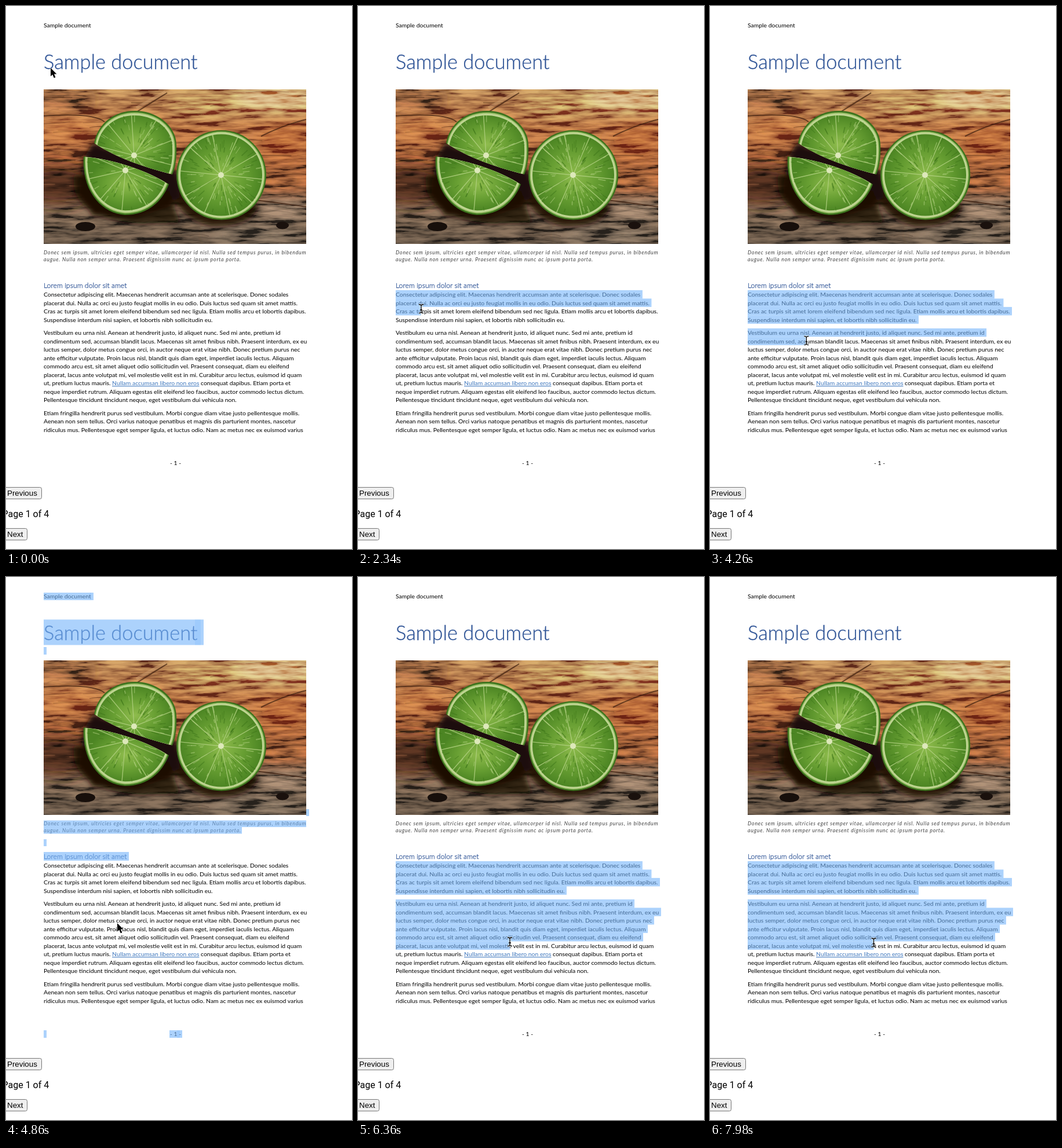
Animation of 597x938 px, one loop 8 s. Source, as an HTML page:

```html
<!DOCTYPE html>
<html lang="en">
<head>
<meta charset="utf-8">
<title>Sample document</title>
<style>
  html, body { margin: 0; width: 100%; height: 100%; overflow: hidden; background: #fff; }
  svg { display: block; width: 100vw; height: 100vh; }
  text { white-space: pre; }
  .doc { font: 10.4px Lato, sans-serif; }
  .title { font-size: 34.4px; font-weight: 300; fill: #2f5496; stroke: #2f5496; stroke-width: .35px; }
  .heading { font-size: 12.3px; font-weight: 300; fill: #2f5496; stroke: #2f5496; stroke-width: .3px; }
  .caption { font-size: 8.9px; font-style: italic; letter-spacing: .77px; fill: #404040; }
  .link { fill: #3d76bd; text-decoration: underline; }
  .button rect { fill: #efefef; stroke: #767676; }
  .button text { font: 13.33px "Liberation Sans", Arial, sans-serif; }
  .status { font: 16px Roboto, sans-serif; }
  .mark { fill: rgb(118 180 250 / .6); }
  .texture { mix-blend-mode: overlay; }
</style>
</head>
<body>
<svg viewBox="0 0 597 938" preserveAspectRatio="none">
  <defs>
    <linearGradient id="wood" x1="0" y1="0" x2="0" y2="1">
      <stop offset="0" stop-color="#9a6842"/>
      <stop offset=".25" stop-color="#9c5a35"/>
      <stop offset=".6" stop-color="#784629"/>
      <stop offset=".76" stop-color="#63503f"/>
      <stop offset="1" stop-color="#524539"/>
    </linearGradient>
    <radialGradient id="flesh">
      <stop offset="0" stop-color="#8fbc4d"/>
      <stop offset=".55" stop-color="#689f33"/>
      <stop offset="1" stop-color="#4c8523"/>
    </radialGradient>
    <filter id="soft" x="-50%" y="-50%" width="200%" height="200%"><feGaussianBlur stdDeviation="12"/></filter>
    <filter id="edge" x="-20%" y="-20%" width="140%" height="140%"><feGaussianBlur stdDeviation="5"/></filter>
    <filter id="fibres" x="0" y="0" width="100%" height="100%">
      <feTurbulence type="fractalNoise" baseFrequency=".018 .13" numOctaves="4" seed="4"/>
      <feColorMatrix values="2.6 0 0 0 -.85  2.6 0 0 0 -.85  2.6 0 0 0 -.85  0 0 0 0 1"/>
    </filter>
    <clipPath id="frame"><rect x="65" y="144" width="453" height="267"/></clipPath>
  </defs>

  <g id="photo" clip-path="url(#frame)">
    <rect x="65" y="144" width="453" height="267" fill="url(#wood)"/>
    <g filter="url(#soft)">
      <ellipse cx="465" cy="160" rx="80" ry="20" fill="#d0a06c"/>
      <ellipse cx="345" cy="172" rx="65" ry="18" fill="#b5814f"/>
      <ellipse cx="95" cy="162" rx="50" ry="14" fill="#70482d"/>
      <ellipse cx="110" cy="216" rx="45" ry="18" fill="#a75a32"/>
      <ellipse cx="480" cy="235" rx="45" ry="32" fill="#a6562f"/>
      <ellipse cx="480" cy="300" rx="40" ry="18" fill="#8f5433"/>
      <ellipse cx="90" cy="310" rx="60" ry="34" fill="#3a2315"/>
      <ellipse cx="480" cy="350" rx="50" ry="14" fill="#776352"/>
      <ellipse cx="430" cy="395" rx="80" ry="14" fill="#64564a"/>
    </g>
    <rect class="texture" x="65" y="144" width="453" height="267" filter="url(#fibres)" opacity=".6"/>
    <g id="grain" fill="none"/>
    <path d="M65 190Q150 184 170 200M190 205L278 150M440 225Q480 205 518 196M430 335Q470 340 518 347" fill="none" stroke="#3d1e0f" stroke-width="2" opacity=".7"/>
    <path d="M225 176L275 148" stroke="#d0a070" stroke-width="5" opacity=".5"/>
    <g fill="#1d0e07" filter="url(#edge)">
      <path d="M150 236L296 285 300 330 285 345 225 366 150 362 125 325 134 262Z"/>
      <path d="M278 300Q290 365 355 380Q420 382 435 346L380 280Z" opacity=".9"/>
      <path d="M118 290Q105 365 230 376L300 374 280 320Z" opacity=".8"/>
    </g>
    <ellipse cx="137" cy="381" rx="17" ry="8" fill="#170f0b"/>
    <ellipse cx="477" cy="379" rx="11" ry="6.5" fill="#1a110d"/>
    <g id="limes"/>
  </g>

  <g id="page" class="doc"></g>

  <g class="button"><rect x="-5.5" y="831.5" width="67" height="20" rx="3"/><text x="2" y="846">Previous</text></g>
  <text class="status" x="-6.5" y="883">Page 1 of 4</text>
  <g class="button"><rect x="-5.5" y="902.5" width="42" height="20" rx="3"/><text x="2" y="917">Next</text></g>

  <g id="selection" class="mark"></g>
  <g id="outside" class="mark"></g>
  <path id="arrow" d="M0 0V14.5L3.3 11.5 5.8 17.3 8.4 16.2 6 10.5H10.4Z" stroke="#fff" stroke-width="1" paint-order="stroke"/>
  <g id="beam" fill="none">
    <path d="M-4-7.5Q0-7.5 0-5V5Q0 7.5-4 7.5M4-7.5Q0-7.5 0-5V5Q0 7.5 4 7.5M-2 2H2" stroke="#fff" stroke-width="3" opacity=".7"/>
    <path d="M-4-7.5Q0-7.5 0-5V5Q0 7.5-4 7.5M4-7.5Q0-7.5 0-5V5Q0 7.5 4 7.5M-2 2H2" stroke="#000" stroke-width="1.3"/>
  </g>
</svg>
<script>
const LEFT = 65, LEADING = 14.5, LOOP = 8000, STEP = 60;
const $ = id => document.getElementById(id);

function add(parent, tag, attrs, text) {
  const node = document.createElementNS('http://www.w3.org/2000/svg', tag);
  for (const name in attrs) node.setAttribute(name, attrs[name]);
  if (text) node.textContent = text;
  return parent.appendChild(node);
}

let seed = 7;
const random = () => (seed = seed * 16807 % 2147483647) / 2147483647;

// Photograph
function drawGrain() {
  for (let i = 0; i < 130; i++) {
    const x = 55 + random() * 450, y = 146 + random() * 264, length = 15 + random() * 60;
    const tones = y < 330 ? ['#40200f', '#d3935f'] : ['#241b16', '#9a8672'];
    add($('grain'), 'path', {
      d: `M${x} ${y}q${length / 2} ${random() * 6 - 5} ${length} ${random() * 6 - 4}`,
      stroke: tones[i % 2], 'stroke-width': .5 + random() * 1.3, opacity: .2 + random() * .25
    });
  }
}

// The rind is thick away from `cut`, the middle of the cut edge; the rays meet at `hub`
function drawLime(id, outline, hub, cut, radius, turn) {
  const scaled = s => `translate(${cut}) scale(${s}) translate(${cut.map(v => -v)})`;
  const layer = (s, fill) => add($('limes'), 'path', { d: outline, fill, transform: scaled(s) });
  const point = (angle, r) => [hub[0] + Math.cos(angle) * r, hub[1] + Math.sin(angle) * r];
  const ray = (group, angle, from, to, attrs) => add(group, 'path', {
    d: `M${point(angle, from)}L${point(angle, to)}`, 'stroke-linecap': 'round', ...attrs
  });
  layer(1, '#3b731d');
  layer(.97, '#8fb75d');
  layer(.95, '#bfd592');
  layer(.91, 'url(#flesh)');
  const clip = add($('limes'), 'clipPath', { id });
  add(clip, 'path', { d: outline, transform: scaled(.92) });
  const pulp = add($('limes'), 'g', { 'clip-path': `url(#${id})` });
  for (let i = 0; i < 130; i++) {
    const from = radius * (.2 + random() * .65);
    ray(pulp, random() * Math.PI * 2, from, from + 4 + random() * 9, {
      stroke: i % 2 ? '#b6d485' : '#3d7519', 'stroke-width': 1 + random(), opacity: .5
    });
  }
  for (let i = 0; i < 10; i++) {
    ray(pulp, turn + i * Math.PI / 5, 0, radius, { stroke: '#b3d183', 'stroke-width': 1.4, opacity: .8 });
  }
  add(pulp, 'circle', { cx: hub[0], cy: hub[1], r: 5, fill: '#dde8ba' });
}

drawGrain();
drawLime('limeTop', 'M152 237C158 203 187 181 222 181C262 181 294 208 294 240C295 262 292 280 287 291C240 279 190 262 152 237Z', [221, 258], [216, 269], 90, .25);
drawLime('limeBottom', 'M134 260C180 264 240 282 281 308C268 342 240 361 205 361C165 358 130 320 134 260Z', [206, 284], [209, 276], 90, .4);
drawLime('limeRight', 'M294 292a77.5 77.5 0 1 0 155 0a77.5 77.5 0 1 0-155 0Z', [371, 292], [371.5, 292], 78, .1);

// Document text
const write = (y, text, style = '', x = LEFT) => add($('page'), 'text', { x, y, class: style }, text);

write(37, 'Sample document');
write(109, 'Sample document', 'title');
write(429, 'Donec sem ipsum, ultricies eget semper vitae, ullamcorper id nisl. Nulla sed tempus purus, in bibendum', 'caption');
write(441, 'augue. Nulla non semper urna. Praesent dignissim nunc ac ipsum porta porta.', 'caption');
write(487, 'Lorem ipsum dolor sit amet', 'heading');
write(793.3, '- 1 -', '', 283);

const paragraphs = [
  [502.2, `Consectetur adipiscing elit. Maecenas hendrerit accumsan ante at scelerisque. Donec sodales
placerat dui. Nulla ac orci eu justo feugiat mollis in eu odio. Duis luctus sed quam sit amet mattis.
Cras ac turpis sit amet lorem eleifend bibendum sed nec ligula. Etiam mollis arcu et lobortis dapibus.
Suspendisse interdum nisi sapien, et lobortis nibh sollicitudin eu.`],
  [568.2, `Vestibulum eu urna nisl. Aenean at hendrerit justo, id aliquet nunc. Sed mi ante, pretium id
condimentum sed, accumsan blandit lacus. Maecenas sit amet finibus nibh. Praesent interdum, ex eu
luctus semper, dolor metus congue orci, in auctor neque erat vitae nibh. Donec pretium purus nec
ante efficitur vulputate. Proin lacus nisl, blandit quis diam eget, imperdiet iaculis lectus. Aliquam
commodo arcu est, sit amet aliquet odio sollicitudin vel. Praesent consequat, diam eu eleifend
placerat, lacus ante volutpat mi, vel molestie velit est in mi. Curabitur arcu lectus, euismod id quam
ut, pretium luctus mauris. [Nullam accumsan libero non eros] consequat dapibus. Etiam porta et
neque imperdiet rutrum. Aliquam egestas elit eleifend leo faucibus, auctor commodo lectus dictum.
Pellentesque tincidunt tincidunt neque, eget vestibulum dui vehicula non.`],
  [706.8, `Etiam fringilla hendrerit purus sed vestibulum. Morbi congue diam vitae justo pellentesque mollis.
Aenean non sem tellus. Orci varius natoque penatibus et magnis dis parturient montes, nascetur
ridiculus mus. Pellentesque eget semper ligula, et luctus odio. Nam ac metus nec ex euismod varius`]
];

const lines = paragraphs.flatMap(([baseline, copy]) => copy.split('\n').map((line, i) => {
  const y = baseline + i * LEADING;
  const node = write(y, '');
  line.split(/[[\]]/).forEach((part, k) => add(node, 'tspan', { class: k === 1 ? 'link' : '' }, part));
  const right = LEFT + node.getComputedTextLength() + 3.5;
  const mark = add($('selection'), 'rect', { x: LEFT, y: y - 11.3, height: LEADING, width: 0 });
  return { top: y - 11.3, right, mark };
}));

// Everything before the paragraphs, marked while the pointer is between lines
[
  [65, 27, 86, 13], [145, 27, 2, 13],
  [65, 73.5, 276, 44], [326, 73.5, 10, 44],
  [65, 121, 5, 13], [518, 401, 5, 12],
  [65, 420.5, 453, 11.5], [65, 432, 342, 11.5],
  [65, 453, 5, 12], [65, 475, 147, 15],
  [65, 783, 5, 13], [282, 783, 22, 13], [295, 783, 5, 13]
].forEach(([x, y, width, height], i) =>
  add($('outside'), 'rect', { x, y, width, height, opacity: [1, 3, 12].includes(i) ? .4 : 1 }));

// Pointer: time, x, y
const path = [
  [0, 77, 107], [300, 77, 109], [1200, 67, 496], [1560, 67, 498], [2340, 109, 523],
  [3060, 125, 540], [3420, 131, 547], [3600, 132, 548], [3840, 140, 558], [4620, 189, 595],
  [4860, 192, 598], [5100, 196, 601], [5940, 243.5, 622], [6360, 262, 630],
  [7200, 280, 631], [7500, 282.5, 631.5], [8000, 282.5, 631.5]
];
const gaps = [[3420, 3840], [4620, 5100]];
const DRAG_START = 1500;

function pointerAt(t) {
  const i = path.findIndex(key => key[0] > t);
  const [a, b] = [path[i - 1], path[i]];
  const k = (t - a[0]) / (b[0] - a[0]);
  return [a[1] + (b[1] - a[1]) * k, a[2] + (b[2] - a[2]) * k];
}

const show = (node, on) => node.setAttribute('visibility', on ? 'visible' : 'hidden');

function render(t) {
  const [x, y] = pointerAt(t);
  const inGap = gaps.some(([from, to]) => t >= from && t < to);
  const overText = y > 491 && !inGap;
  const current = lines.filter(line => line.top <= y).length - 1;

  lines.forEach(({ right, mark }, i) => {
    const end = i < current ? right : i === current ? Math.min(x, right) : LEFT;
    mark.setAttribute('width', Math.max(0, end - LEFT));
  });
  show($('selection'), t >= DRAG_START && !inGap);
  show($('outside'), inGap);
  show($('beam'), overText);
  show($('arrow'), !overText);
  for (const id of ['beam', 'arrow']) $(id).setAttribute('transform', `translate(${x} ${y})`);
}

function tick() {
  render(Math.floor(performance.now() % LOOP / STEP) * STEP);
  requestAnimationFrame(tick);
}
tick();
</script>
</body>
</html>
```
